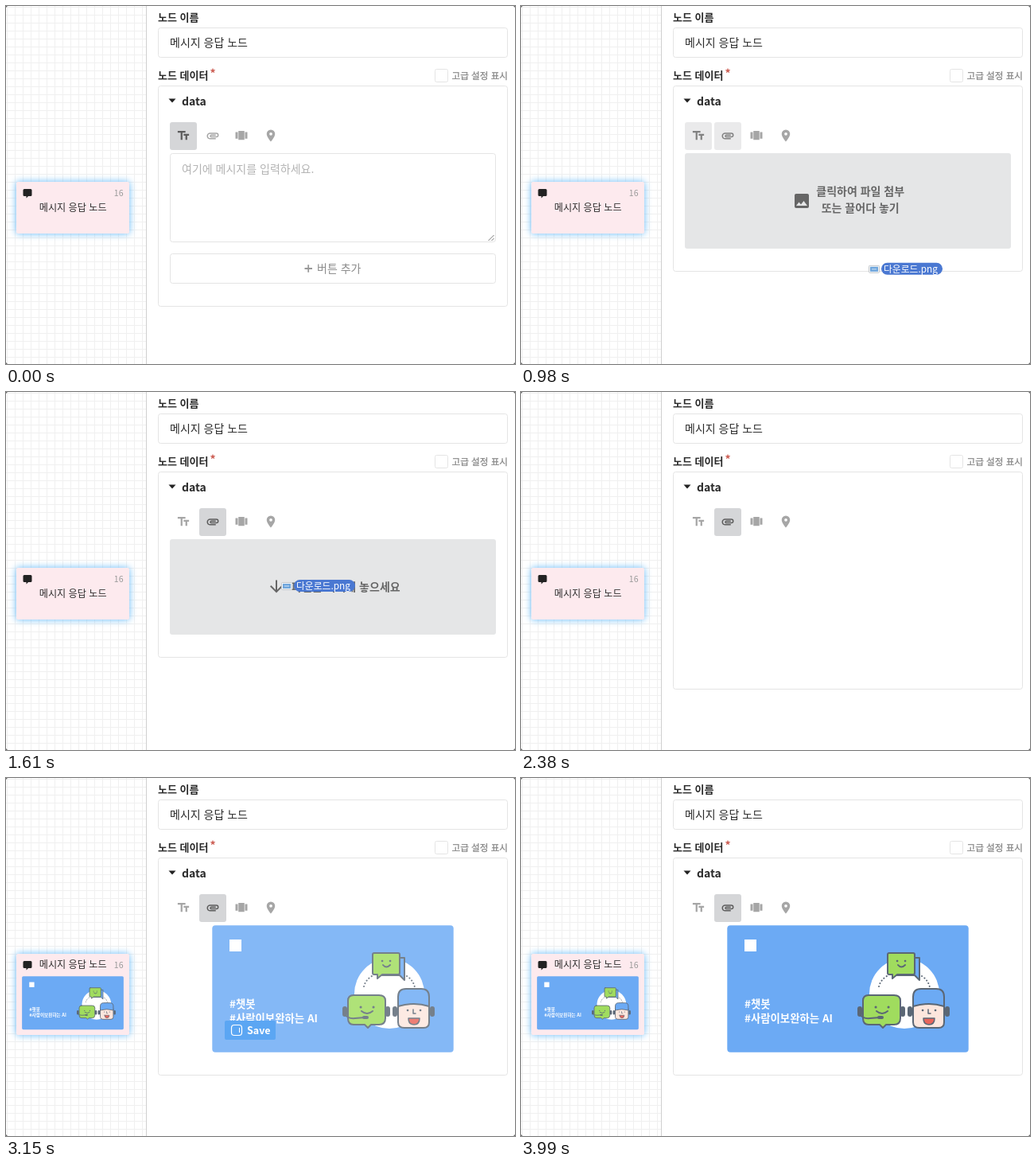
Write an HTML page that moves like this. It is 640 by 450 pixels and loops after 4.2 s.

```html
<!DOCTYPE html>
<html lang="ko">
<head>
<meta charset="utf-8">
<title>메시지 응답 노드</title>
<style>
  html, body { margin: 0; width: 100%; height: 100%; overflow: hidden; background: #fff; }
  svg { display: block; width: 100%; height: 100%; }
  text { font-family: "Noto Sans CJK KR", "Noto Sans CJK", "Noto Sans", sans-serif; font-size: 14px; fill: #2a2a2a; }
  .bold { font-weight: 700; }
  .label { font-size: 13px; font-weight: 700; }
  .tag text { font-size: 13.4px; font-weight: 700; fill: #fff; }
  .hint text { font-weight: 700; fill: #666; }
  .line { fill: #fff; stroke: #e4e4e4; }
  .ink { stroke: #5b6775; stroke-width: 2; stroke-linejoin: round; stroke-linecap: round; }
  .none { fill: none; }
  #card { filter: drop-shadow(0 0 5px #62b9f8); }
</style>
</head>
<body>
<svg viewBox="0 0 640 450" xmlns="http://www.w3.org/2000/svg">
  <defs>
    <pattern id="grid" x="1" y="1" width="10" height="10" patternUnits="userSpaceOnUse">
      <path d="M.5 0V10M0 .5H10" stroke="#f0f0f0"/>
    </pattern>
    <g id="art">
      <rect x=".3" y=".3" width="303.4" height="159.4" rx="4" fill="#6caaf4"/>
      <rect x="22" y="18" width="15" height="15" fill="#fff"/>
      <g class="tag">
        <text x="22" y="104">#챗봇</text>
        <text x="22" y="122">#사람이보완하는 AI</text>
      </g>
      <circle cx="223" cy="86" r="44" fill="#fff"/>
      <path d="M191 77Q193 69 201 64M245 64Q253 69 255 78" class="ink none" stroke-dasharray=".1 4"/>
      <g class="ink">
        <path d="M211 41H242V69L236 63H211Z" fill="#6caaf4"/>
        <path d="M204 35H234Q236 35 236 37V60Q236 62 234 62H214L208 67V62H204Q202 62 202 60V37Q202 35 204 35Z" fill="#a0dc5e"/>
        <path d="M215 50Q219 55 224 50" class="none"/>
        <path d="M214 45h.1M224 45h.1" stroke-width="2.6"/>

        <path d="M178 88H210Q218 88 218 95V117Q218 125 210 125H200L196 129L192 125H178Q171 125 171 117V95Q171 88 178 88Z" fill="#a0dc5e"/>
        <path d="M188 108Q195 114 202 108" class="none"/>
        <path d="M187 103h.1M203 103h.1" stroke-width="3"/>
        <path d="M167 112Q171 118 180 117L192 116" class="none"/>
        <path d="M191 116h4" stroke-width="4"/>
        <path d="M167 105V112M221 105V112" stroke-width="6"/>

        <path d="M234 98V122Q234 129 242 129H266Q273 129 273 122V98Z" fill="#fde6dd"/>
        <path d="M234 102V90Q234 80 244 80H263Q273 80 273 90V102Q254 96 234 102Z" fill="#6caaf4"/>
        <path d="M246 107h.1M262 107h.1" stroke-width="2.6"/>
        <path d="M253 106V111H256" class="none" stroke-width="1.5"/>
        <path d="M247 117H261Q261 125 254 125Q247 125 247 117Z" fill="#e8655b" stroke-width="1.5"/>
        <path d="M230 105V112M277 105V112" stroke-width="6"/>
      </g>
    </g>
  </defs>

  <rect width="640" height="450" fill="#fff"/>
  <rect width="176" height="450" fill="url(#grid)"/>
  <path d="M176.5 0V450" stroke="#cfcfcf"/>

  <rect id="card" x="13" y="221" width="142" height="65" rx="2" fill="#fdeaee"/>
  <path d="M23 230H31Q32.5 230 32.5 231.5V237.5Q32.5 239 31 239H28L25.5 241.5V239H23Q21.5 239 21.5 237.5V231.5Q21.5 230 23 230Z" fill="#222"/>
  <text x="147.5" y="239" text-anchor="end" style="font-size:10.5px;fill:#999">16</text>
  <text id="cardName" x="84.2" text-anchor="middle" style="font-size:12.1px">메시지 응답 노드</text>
  <use id="thumb" href="#art" transform="translate(20 249) scale(.421)"/>

  <text x="191" y="18.5" class="label">노드 이름</text>
  <rect x="191.5" y="27.5" width="439" height="37" rx="3" class="line"/>
  <text x="206" y="50.5">메시지 응답 노드</text>
  <text x="191" y="91.5" class="label">노드 데이터</text>
  <text x="256.5" y="90" class="bold" style="fill:#cb5a50">*</text>
  <rect x="539.5" y="79.5" width="16" height="16" rx="2" class="line"/>
  <text x="631" y="91.5" text-anchor="end" stroke="#858585" stroke-width=".25" style="font-size:11.6px;fill:#858585">고급 설정 표시</text>

  <rect id="panel" x="191.5" y="100.5" width="439" rx="3" class="line"/>
  <path d="M204.5 116.5H213.5L209 121.5Z" fill="#222"/>
  <text x="221" y="125" class="bold">data</text>
  <g id="tabs"></g>

  <g id="form">
    <rect x="206.5" y="185.5" width="409" height="111" rx="3" class="line"/>
    <text x="221" y="209.5" style="fill:#b3b3b3">여기에 메시지를 입력하세요.</text>
    <path d="M606.5 295L613.5 288M610.5 295L613.5 292" stroke="#777"/>
    <rect x="206.5" y="311.5" width="409" height="37" rx="3" class="line"/>
    <path d="M375.5 330H385M380.2 325.2V334.8" stroke="#999" stroke-width="1.8"/>
    <text x="391" y="334.5" style="fill:#8c8c8c">버튼 추가</text>
  </g>

  <g id="zone" class="hint">
    <rect x="206" y="185" width="410" height="120" rx="3" fill="#e5e6e7"/>
    <g id="pick">
      <path transform="translate(341 233)" fill="#666" d="M21 19V5c0-1.1-.9-2-2-2H5c-1.1 0-2 .9-2 2v14c0 1.1.9 2 2 2h14c1.1 0 2-.9 2-2zM8.5 13.5l2.5 3L14.5 12l4.5 6H5z"/>
      <text x="426.7" y="238.2" text-anchor="middle">클릭하여 파일 첨부</text>
      <text x="426.7" y="259.2" text-anchor="middle">또는 끌어다 놓기</text>
    </g>
    <g id="drop">
      <path transform="translate(328 232.5)" fill="#666" d="M20 12l-1.4-1.4L13 16.2V4h-2v12.2l-5.6-5.6L4 12l8 8z"/>
      <text x="359" y="249.5">파일을 여기에 놓으세요</text>
    </g>
  </g>

  <g id="file">
    <rect x=".5" y="3.5" width="13" height="9" rx="1" fill="#f4f6f8" stroke="#c4c8cc"/>
    <rect x="2" y="5" width="10" height="6" fill="#6fa6dc"/>
    <path d="M4 8H10" stroke="#cfe2f5"/>
    <rect x="16" width="77" height="15" rx="7.5" fill="#4a78d2"/>
    <text x="19" y="12" style="font-size:11.8px;font-weight:300;fill:#fff">다운로드.png</text>
  </g>

  <g id="preview">
    <use href="#art" x="259" y="185"/>
    <g id="hover">
      <rect x="259" y="185" width="304" height="160" rx="4" fill="#fff" opacity=".16"/>
      <rect x="275" y="305" width="64" height="24" rx="2" fill="#5ba6f3"/>
      <rect x="283.5" y="310.5" width="13" height="13" rx="3.5" fill="none" stroke="#fff" stroke-width="1.2"/>
      <path d="M293.5 314V320" stroke="#fff"/>
      <text x="303" y="321.5" class="bold" style="font-size:12.5px;fill:#fff">Save</text>
    </g>
  </g>

  <path d="M0 0H2L0 2ZM640 0V2L638 0ZM0 450V448L2 450ZM640 450H638L640 448Z" fill="#666"/>
</svg>
<script>
const LOOP = 4200, TICK = 70;
const $ = id => document.getElementById(id);
const show = (id, on) => { $(id).style.display = on ? '' : 'none'; };
const clamp = v => Math.max(0, Math.min(1, v));
const ramp = (t, from, to) => clamp((t - from) / (to - from));
const mix = (a, b, p) => a + (b - a) * p;
const easeOut = p => 1 - (1 - p) ** 2;
const easeInOut = p => p * p * (3 - 2 * p);

const icons = [
  'M2.5 4v3h5v12h3V7h5V4zm19 5h-9v3h3v7h3v-7h3z',
  'M2 12.5C2 9.46 4.46 7 7.5 7H18a4 4 0 0 1 0 8H9.5a2.5 2.5 0 0 1 0-5H17v2H9.41c-.55 0-.55 1 0 1H18a2 2 0 0 0 0-4H7.5a3.5 3.5 0 0 0 0 7H17v2H7.5C4.46 18 2 15.54 2 12.5z',
  'M7 19h10V4H7zm-5-2h4V6H2zM18 6v11h4V6z',
  'M12 2a7 7 0 0 0-7 7c0 5.25 7 13 7 13s7-7.75 7-13a7 7 0 0 0-7-7zm0 9.5a2.5 2.5 0 1 1 0-5 2.5 2.5 0 0 1 0 5z'
];
$('tabs').innerHTML = icons.map((d, i) => `<g transform="translate(${206 + Math.round(36.5 * i)} 146)">
  <rect width="34" height="35" rx="3" fill="#d5d6d8"/>
  <path d="${d}" transform="translate(8 8) scale(.75)"/></g>`).join('');
const tabs = [...$('tabs').children];

function setTab(i, active) {
  const [back, icon] = tabs[i].children;
  const grey = Math.round(mix(166, 92, active));
  back.setAttribute('opacity', active);
  icon.setAttribute('fill', `rgb(${grey},${grey},${grey})`);
}

function filePos(t) {
  if (t < 1260) {
    const p = easeOut(ramp(t, 770, 1120));
    return [mix(626, 401, p), mix(398, 308.5, p)];
  }
  const p = easeInOut(ramp(t, 1260, 1610));
  return [mix(401, 346, p), mix(308.5, 236, p)];
}

function draw(t) {
  const done = t >= 2450, zone = t >= 840 && t < 2380;
  const dropping = t >= 1400 && t < 2310;
  const swap = ramp(t, 840, 1120);
  [1 - swap, swap, 0, 0].forEach((active, i) => setTab(i, active));

  show('form', t < 840);
  show('zone', zone);
  show('pick', !dropping);
  show('drop', dropping);
  show('file', t >= 840 && t < 2310);
  show('preview', done);
  show('thumb', done);

  $('file').setAttribute('transform', `translate(${filePos(t)})`);
  $('panel').setAttribute('height', t < 840 ? 277 : zone ? 233 : 273);
  $('card').setAttribute('height', done ? 102 : 65);
  $('cardName').setAttribute('y', done ? 239 : 257.5);
  $('hover').setAttribute('opacity', 1 - ramp(t, 3780, 3990));
}

const start = performance.now();
function frame() {
  const t = (performance.now() - start) % LOOP;
  draw(Math.floor(t / TICK) * TICK);
  requestAnimationFrame(frame);
}
frame();
</script>
</body>
</html>
```
